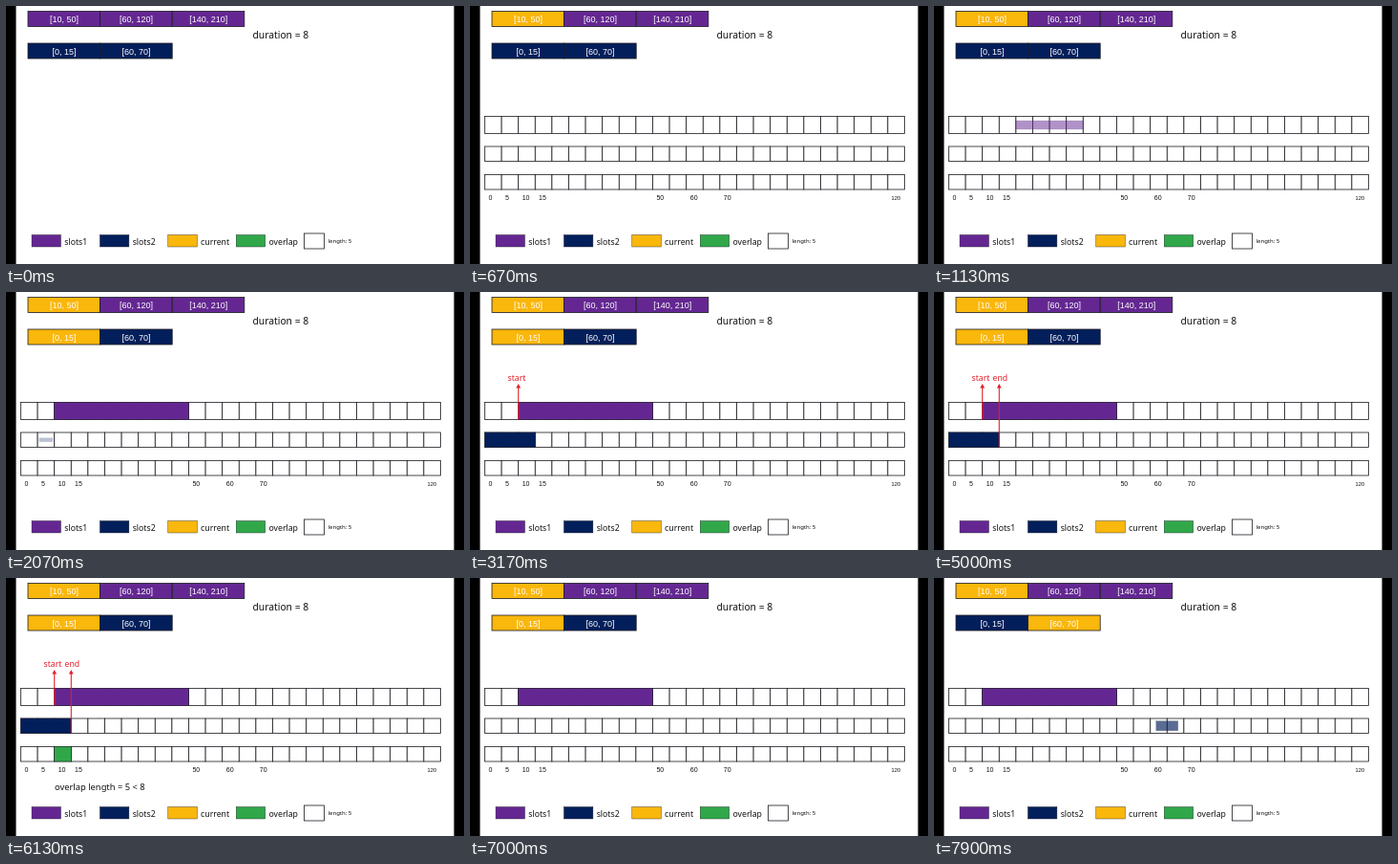
An HTML page for the animation above (8 s loop, 480x270 px).

```html
<!DOCTYPE html>
<html lang="en">
<head>
<meta charset="utf-8">
<title>Overlapping time slots</title>
<style>
html, body { margin: 0; width: 100%; height: 100%; overflow: hidden; background: #000; }
svg { display: block; width: 100vw; height: 100vh; }
text { font-family: "Noto Sans", "Open Sans", sans-serif; fill: #111; }
.digits { font-family: "Liberation Sans", Arial, sans-serif; }
</style>
</head>
<body>
<svg id="stage" viewBox="0 0 480 270"></svg>
<script>
const LOOP = 8000, ZOOM = 500;
const PURPLE = '#642792', NAVY = '#031f5b', YELLOW = '#fab70c',
      GREEN = '#30a84a', RED = '#e0202a', INK = '#1c1c24';
const stage = document.getElementById('stage');

function add(tag, attrs, parent = stage) {
  const node = document.createElementNS('http://www.w3.org/2000/svg', tag);
  for (const key in attrs) node.setAttribute(key, attrs[key]);
  parent.appendChild(node);
  return node;
}
const rect = (x, y, width, height, fill, stroke = 'none', parent = stage) =>
  add('rect', { x, y, width, height, fill, stroke, 'stroke-width': 0.8 }, parent);
function label(x, y, size, words, attrs = {}, parent = stage) {
  const node = add('text', { x, y, 'font-size': size, ...attrs }, parent);
  node.textContent = words;
  return node;
}

rect(10.5, 0, 459, 270, '#fff');

// Slot lists at the top
function slotRow(y, fill, names) {
  return names.map((name, i) => {
    const x = 23 + i * 75.6;
    const box = rect(x, y, 75.6, 16, fill, INK);
    label(x + 38, y + 11.5, 9, name,
      { class: 'digits', 'text-anchor': 'middle', style: 'fill:#fff' });
    return { box, fill };
  });
}
const slots1 = slotRow(5.5, PURPLE, ['[10, 50]', '[60, 120]', '[140, 210]']);
const slots2 = slotRow(39, NAVY, ['[0, 15]', '[60, 70]']);
label(258.5, 34, 10.3, 'duration = 8');

// Legend
[['slots1', PURPLE], ['slots2', NAVY], ['current', YELLOW], ['overlap', GREEN]]
  .forEach(([name, fill], i) => {
    const x = 27 + i * 71.4;
    rect(x, 239.5, 30.5, 12.5, fill, INK).setAttribute('stroke-width', 0.4);
    label(x + 34.3, 249.5, 8.7, name);
  });
rect(312.5, 238, 21, 16, '#fff', INK);
label(337.5, 248, 6, 'length: 5');

// Timelines: one cell stands for five units
const CELL = 17.6, LEFT = 15.5;
const rows = [{ y: 115.5, h: 18 }, { y: 147, h: 15.5 }, { y: 176.5, h: 15.5 }];
const at = value => LEFT + value / 5 * CELL;
const grid = add('g', {});
for (const { y, h } of rows)
  for (let i = 0; i < 25; i++) rect(LEFT + i * CELL, y, CELL, h, '#fff', INK, grid);
const tick = (x, words, size = 7) =>
  label(x, 202.6, size, words, { class: 'digits', 'text-anchor': 'middle' }, grid);
[[0, 21.5], [5, 39], [10, 58.6], [15, 76], [50, 199.3], [60, 234.7], [70, 269.7]]
  .forEach(([value, x]) => tick(x, value));
tick(446.3, 120, 5.8);

function bar(row, from, to, fill, start, end = LOOP) {
  const { y, h } = rows[row], x = at(from), width = at(to) - x;
  const node = rect(x, y, width, h, fill, INK);
  node.setAttribute('stroke-width', 0.5);
  return { node, start, end, cx: x + width / 2, cy: y + h / 2 };
}
const bars = [
  bar(0, 10, 50, PURPLE, 880),
  bar(1, 0, 15, NAVY, 1935, 6900),
  bar(2, 10, 15, GREEN, 5200, 6900),
  bar(1, 60, 70, NAVY, 7575)
];

function marker(value, bottom, words, textX) {
  const group = add('g', {}), x = at(value);
  add('path', { d: `M${x} ${bottom}V99`, stroke: RED, 'stroke-width': 1.1 }, group);
  add('path', { d: `M${x} 96l2.4 4.6h-4.8z`, fill: RED }, group);
  label(textX, 93.3, 8.7, words, { 'text-anchor': 'middle', style: `fill:${RED}` }, group);
  return group;
}
const note = label(51, 222, 9.35, 'overlap length = 5 < 8');

// Parts that switch on and off: [node, from, to]
const switches = [
  [grid, 350, LOOP],
  [marker(10, 133.5, 'start', 49), 2800, 6900],
  [marker(15, 162.5, 'end', 69.4), 4250, 6900],
  [note, 5800, 6900]
];
const highlights = [
  [slots1[0], 600, LOOP],
  [slots2[0], 1650, 7150],
  [slots2[1], 7150, LOOP]
];

function draw(t) {
  const within = (from, to) => t >= from && t < to;
  for (const [node, from, to] of switches)
    node.style.display = within(from, to) ? '' : 'none';
  for (const [slot, from, to] of highlights)
    slot.box.setAttribute('fill', within(from, to) ? YELLOW : slot.fill);
  for (const { node, start, end, cx, cy } of bars) {
    const k = within(start, end) ? Math.min(1, (t - start) / ZOOM) : 0;
    node.style.display = k ? '' : 'none';
    node.setAttribute('opacity', k);
    node.setAttribute('transform',
      `translate(${cx} ${cy}) scale(${k}) translate(${-cx} ${-cy})`);
  }
}

const begin = performance.now();
function frame() {
  draw((performance.now() - begin) % LOOP);
  requestAnimationFrame(frame);
}
draw(0);
requestAnimationFrame(frame);
</script>
</body>
</html>
```
